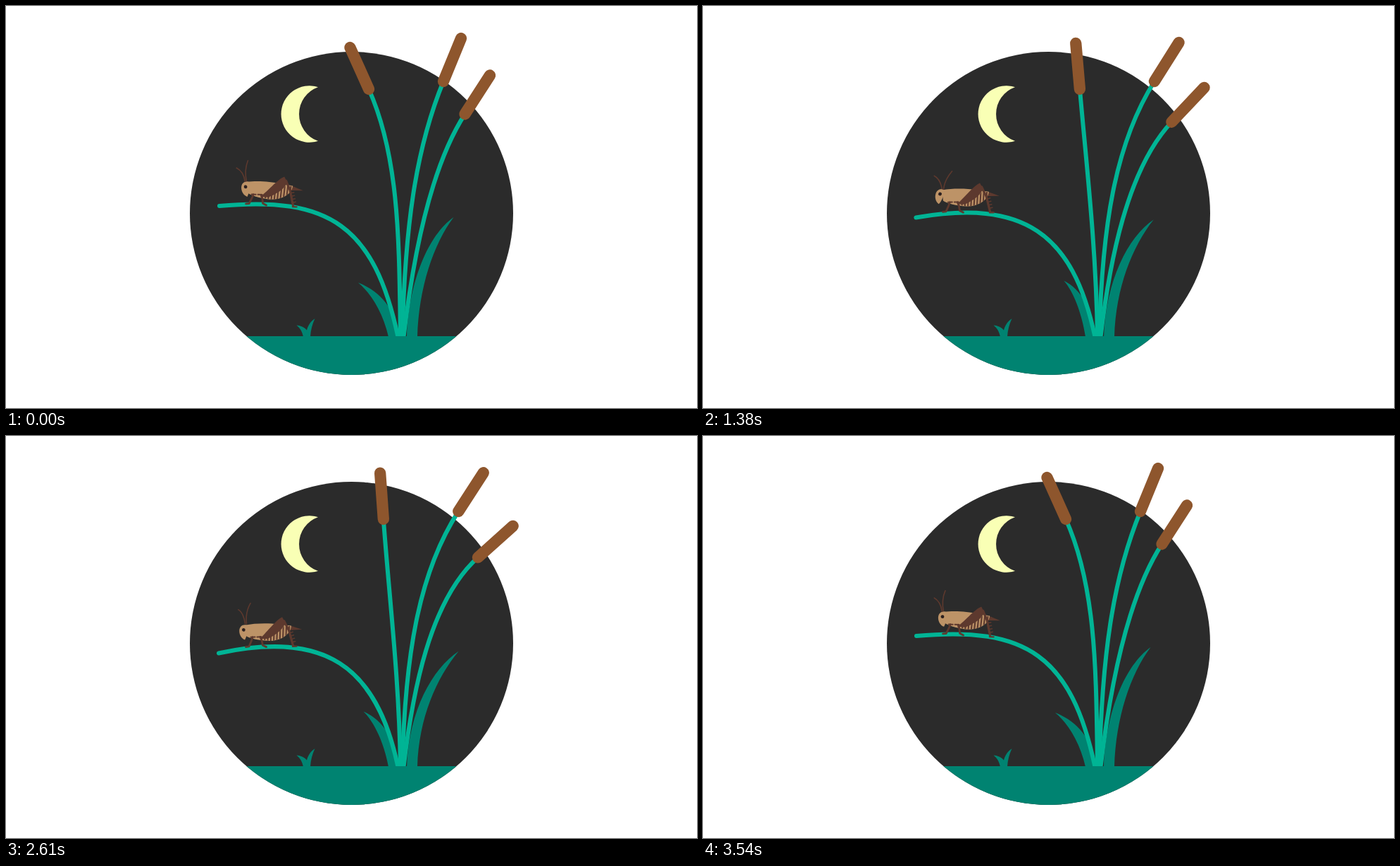
Write an HTML page that moves like this. It is 981 by 571 pixels and loops after 3.6 s.

```html
<!DOCTYPE html>
<html lang="en">
<head>
<meta charset="utf-8">
<title>Cricket at night</title>
<style>
  html, body { margin: 0; width: 100%; height: 100%; overflow: hidden; background: #fff; }
  svg { display: block; width: 981px; height: 571px; }
  .stem { fill: none; stroke: #00b495; stroke-width: 6; stroke-linecap: round; }
  .head { fill: none; stroke: #8e562d; stroke-width: 16.3; stroke-linecap: round; }
  .leaf { fill: #008371; }
  .tan { fill: #bd9367; }
  .dark { fill: #5d392e; }
  .line { fill: none; stroke: #5d392e; stroke-linecap: round; stroke-linejoin: round; }
</style>
</head>
<body>
<svg viewBox="0 0 981 571">
  <defs>
    <clipPath id="disc"><circle cx="490.5" cy="294.5" r="229.5"/></clipPath>
    <clipPath id="belly"><path d="M361 280C378 277 391 268 396 262L406 262C405 274 391 283 374 282.5Z"/></clipPath>
  </defs>
  <circle cx="490.5" cy="294.5" r="229.5" fill="#2b2b2b"/>
  <path d="M443 115.2A40.2 40.2 0 1 0 443 191.8A40.7 40.7 0 0 1 443 115.2Z" fill="#f9ffb5"/>
  <path class="leaf" d="M412.5 453.5C419 454 424 456.5 427 460.5C429 453 433 447.5 438.5 444C435 452 432.5 460 432 470H422C420.5 462 417 457 412.5 453.5Z"/>
  <path class="leaf" id="leafL"/>
  <path class="leaf" id="leafR"/>
  <path class="stem" id="bent"/>
  <g id="reeds"></g>
  <rect class="leaf" x="250" y="469" width="480" height="70" clip-path="url(#disc)"/>
  <path class="line" id="feelers" stroke-width="1.6"/>
  <g id="cricket">
    <path class="dark" d="M402 261L421 268L402 268.5Z"/>
    <path class="tan" d="M340 259C355 256.5 375 257 388 259.5L406 262C405 274 391 283 374 282.5C360 281.5 346 278 341 274Z"/>
    <g clip-path="url(#belly)"><path class="line" id="stripes" stroke-width="2.1"/></g>
    <path class="line" stroke-width="2.8" d="M350.5 276.5L348.5 282L345 289.5L340.5 290"/>
    <path class="line" stroke-width="2.8" d="M361.5 276.5L363.5 282L364.5 288.5L369.5 291"/>
    <path class="line" stroke-width="2" d="M348 276.3H354M357 276.3H363"/>
    <path class="line" stroke-width="3.2" d="M396 255L402.5 269L407.5 290"/>
    <path class="line" id="barbs" stroke-width="1.5"/>
    <path class="line" stroke-width="2.4" d="M407 291.5H412.5"/>
    <path class="dark" d="M393.5 249.5C386 252 372 269 361 279L372 279.5C386 273 396 265 397.5 257Z"/>
    <g id="face">
      <path class="tan" d="M343.5 259C336.5 257.5 333 262 333 267C333 273 337 278.8 342 280C344.5 275 345 266 343.5 259Z"/>
      <circle id="eye" cx="339" cy="266" r="2.4" fill="#2b2020"/>
      <path id="lid" class="line" stroke-width="1.6" d="M336.5 267Q339 269 341.5 265.5"/>
    </g>
  </g>
</svg>
<script>
const LOOP = 3600, STEP = 30, REST = 3540, TURN = 2450;
const $ = id => document.getElementById(id);
const set = (el, name, value) => el.setAttribute(name, value);

// Smooth step from 0 at time a to 1 at time b.
function ramp(t, a, b) {
  const u = Math.min(1, Math.max(0, (t - a) / (b - a)));
  return (1 - Math.cos(Math.PI * u)) / 2;
}

// Lean away with an ease-out of the given power, then swing back.
function sway(t, power) {
  return t < TURN ? 1 - (1 - t / TURN) ** power : 1 - ramp(t, TURN, REST);
}

// The bent stalk sinks, lifts a little, sinks deeper and recovers.
function dip(t) {
  return 13.5 * ramp(t, 0, 480) + 3 * ramp(t, 480, 1380) - 6 * ramp(t, 1380, 1890)
    + 14 * ramp(t, 1890, 2610) - 24.5 * ramp(t, 2610, REST);
}

const reeds = [
  { root: [560, 470], bend: [558, 340], reach: 108, power: 2.85,
    tip: [488.5, 59], base: [515, 118], tipMove: [45, -6.7], baseMove: [22, 0] },
  { root: [562.5, 470], bend: [566.5, 315], reach: 106, power: 2.6,
    tip: [646, 46], base: [621, 107], tipMove: [33.5, 6.6], baseMove: [22.5, 0] },
  { root: [564.5, 470], bend: [577, 364], reach: 92, power: 1.5, sag: true,
    tip: [687, 98.5], base: [651.5, 153.5], tipMove: [34.5, 31], baseMove: [19.5, 20] }
];

function addPath(cls) {
  const p = document.createElementNS("http://www.w3.org/2000/svg", "path");
  set(p, "class", cls);
  return $("reeds").appendChild(p);
}
for (const r of reeds) {
  r.stem = addPath("stem");
  r.head = addPath("head");
}

let bars = "", barbs = "";
for (let x = 364; x < 410; x += 4.3) bars += `M${x + 1} 256L${x - 1} 286`;
for (let i = 0; i < 4; i++) barbs += `M${404 + i} ${272 + i * 4.5}l4 -1`;
set($("stripes"), "d", bars);
set($("barbs"), "d", barbs);

function drawReed(r, t) {
  const sx = sway(t, r.power), sy = r.sag ? sway(t, 1) : sx;
  const at = (p, move) => [p[0] + move[0] * sx, p[1] + move[1] * sy];
  const [tx, ty] = at(r.tip, r.tipMove), [bx, by] = at(r.base, r.baseMove);
  const k = r.reach / Math.hypot(bx - tx, by - ty);
  set(r.stem, "d", `M${r.root}C${r.bend} ${bx + (bx - tx) * k} ${by + (by - ty) * k} ${bx} ${by}`);
  set(r.head, "d", `M${tx} ${ty}L${bx} ${by}`);
}

function drawLeaves(t) {
  const wave = (1 - Math.cos(2 * Math.PI * t / REST)) / 2, sag = sway(t, 1);
  const l = 14 * wave, lx = 500 + l, ly = 393 - 3 * wave;
  const r = 7.5 * sag, rx = 635.5 + r, ry = 300 + 6 * sag;
  set($("leafL"), "d", `M${lx} ${ly}C${518 + l * .6} ${ly + 15} ${535 + l * .2} 435 543 470H557C554 432 ${532 + l * .4} ${ly + 12} ${lx} ${ly}Z`);
  set($("leafR"), "d", `M${rx} ${ry}C${600 + r * .7} ${ry + 25} 572 390 569 470H584C586 400 ${607 + r * .6} ${ry + 38} ${rx} ${ry}Z`);
}

function drawCricket(t) {
  const d = dip(t), e = d - 13.5;
  set($("bent"), "d", `M${303 - d * .04} ${284 + d}C${459 - d * .33} ${269.5 + d * .29} ${523 + d * .12} ${312.5 + d * .5} 556.5 470`);
  set($("cricket"), "transform", `translate(0 ${.57 * e + .008 * e * e}) rotate(${-.18 * e} 410 291)`);

  const nod = 20 * ramp(t, 0, 450) - 13 * ramp(t, 2000, 2550) - 6 * ramp(t, 3000, REST);
  set($("face"), "transform", `rotate(${nod} 342 259)`);
  const shut = t >= 1800 && t < 1980;
  set($("eye"), "visibility", shut ? "hidden" : "visible");
  set($("lid"), "visibility", shut ? "visible" : "hidden");

  const y = 250 + d * .68;
  const lx = 328 - 2 * Math.sin(10 * Math.PI * t / LOOP + .4), ly = y - 20;
  const rx = 343.5 + nod * .5, ry = y - 30.5 + nod * .2;
  set($("feelers"), "d", `M339.5 ${y}Q337.5 ${ly + 5} ${lx} ${ly}M341.5 ${y}Q${338 + nod * .22} ${ry + 13} ${rx} ${ry}`);
}

function draw(ms) {
  const t = Math.min(Math.floor((ms % LOOP) / STEP) * STEP, REST);
  drawLeaves(t);
  drawCricket(t);
  for (const r of reeds) drawReed(r, t);
}

const start = performance.now();
function tick() {
  draw(performance.now() - start);
  requestAnimationFrame(tick);
}
tick();
</script>
</body>
</html>
```
